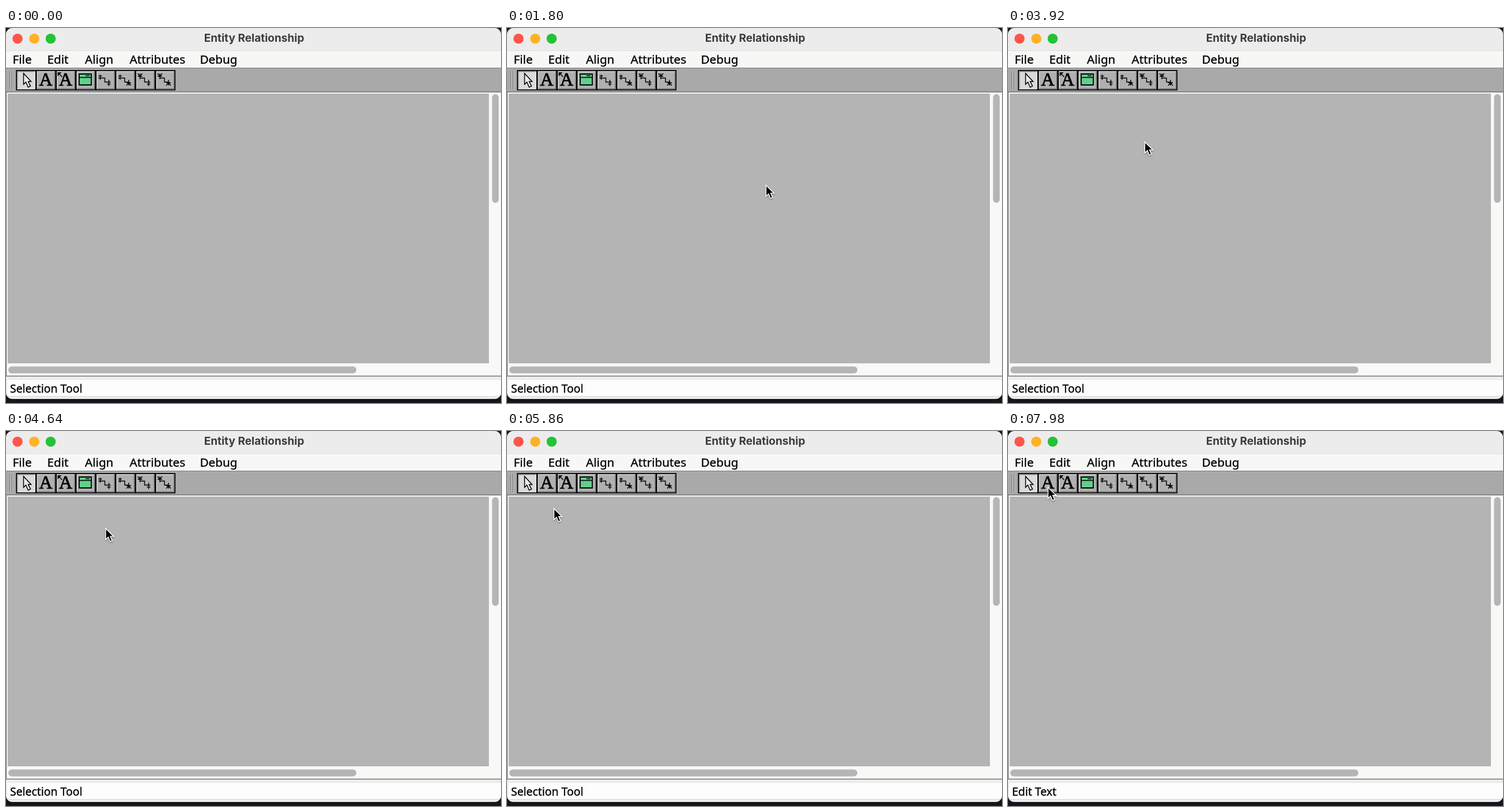
Animation of 859 by 652 pixels, one loop 8 s. Source, as an HTML page:

```html
<!DOCTYPE html>
<html>
<head>
<meta charset="utf-8">
<title>Entity Relationship</title>
<style>
  html, body { margin: 0; width: 100%; height: 100%; overflow: hidden; background: #15151c; }
  svg { display: block; width: 859px; height: 652px; }
  .ui { font: 20.7px "Noto Sans", "Open Sans", sans-serif; stroke: #000; stroke-width: .35px; }
  .status { font-size: 19.4px; }
  .title { font: 700 19px Inter, "Liberation Sans", sans-serif; fill: #3c3c3c; }
  .letter { font: 32px "Liberation Serif", serif; stroke: #000; stroke-width: .9px; }
  .line { fill: none; stroke: #000; stroke-width: 1.4px; }
</style>
</head>
<body>
<svg viewBox="0 0 859 652">
  <defs>
    <clipPath id="window"><rect width="859" height="645" rx="11"/></clipPath>
    <filter id="shadow" x="-50%" y="-50%" width="200%" height="200%">
      <feDropShadow dx="0" dy="1.5" stdDeviation="1.3" flood-opacity=".4"/>
    </filter>
  </defs>
  <g clip-path="url(#window)">
    <rect width="859" height="645" fill="#ececec"/>
    <circle cx="20" cy="18.5" r="8.8" fill="#ff544b"/>
    <circle cx="49" cy="18.5" r="8.8" fill="#ffb125"/>
    <circle cx="77.5" cy="18.5" r="8.8" fill="#22c336"/>
    <text class="title" x="430.5" y="24.3" text-anchor="middle">Entity Relationship</text>

    <rect y="39" width="859" height="30" fill="#f7f7f5"/>
    <rect y="39" width="859" height="1" fill="#dedede"/>
    <g id="menu" class="ui"></g>

    <rect y="69" width="859" height="42" fill="#a9a9a9"/>
    <rect y="69" width="859" height="1" fill="#7c7c7c"/>
    <path d="M6.5 75V106M10.5 75V106" stroke="#777"/>
    <path d="M7.5 75V106M11.5 75V106" stroke="#ccc"/>
    <g id="tools"></g>

    <rect y="111" width="859" height="495" fill="#f8f8f6"/>
    <rect x="3" y="114" width="835" height="469" fill="#b4b4b4"/>
    <path d="M0 111.2H859M.5 111V605M0 605.2H859" stroke="#777" stroke-width="1.4"/>
    <rect x="843.5" y="115" width="11.5" height="189" rx="5.7" fill="#b5b5b5"/>
    <rect x="4" y="588.5" width="604" height="12" rx="6" fill="#b5b5b5"/>

    <rect x="2" y="612" width="857" height="28" fill="#fdfdfd"/>
    <path d="M0 640.5H859" stroke="#d5d5d5"/>
    <text id="status" class="ui status" x="7" y="633.5"></text>
  </g>
  <path id="cursor" filter="url(#shadow)" fill="#000" stroke="#fff" stroke-width="1.4"
    d="M.5 1.5V20.5L4.9 16.4L8.2 24.2L11.8 22.7L8.7 15.2H14.4Z"/>
</svg>
<script>
const byId = id => document.getElementById(id);

const menuItems = { File: 11.5, Edit: 71.5, Align: 137, Attributes: 214.5, Debug: 336.5 };
byId("menu").innerHTML = Object.entries(menuItems)
  .map(([label, x]) => `<text x="${x}" y="62">${label}</text>`).join("");

// Connector icon: each end is either a double bar ("one") or a crow's foot ("many").
function connector(startMany, endMany) {
  const start = startMany ? "M8 6V16M4 11H12M8 11L4 6M8 11L12 6" : "M8 8V17M5 10.5H11M5 14H11";
  const end = endMany ? "M23 17V27M19 22H27M23 22L19 27M23 22L27 27" : "M23 17V28M20 21H26M20 24.5H26";
  return `<path class="line" d="M8 14H16V21H23${start}${end}"/>`;
}

const letter = '<text class="letter" x="17" y="27" text-anchor="middle">A</text>';
const icons = [
  '<path d="M13 6V25L17 21L21 30L25 28L21 20H26Z" fill="#eee" stroke="#000" stroke-width="1.5"/>',
  letter,
  letter + '<path d="M3 4H10L3 11Z"/><path class="line" d="M4 5L11 12"/>',
  '<path d="M6 7H27V26H6Z" fill="#62cf8b" stroke="#000" stroke-width="1.8"/><path class="line" d="M6 13H27M17 10H24"/>',
  connector(false, false),
  connector(false, true),
  connector(true, false),
  connector(true, true)
];
byId("tools").innerHTML = icons.map((icon, i) => `
  <g transform="translate(${17.5 + i * 34.5} 73)">
    <rect x=".7" y="1" width="33.5" height="33.5" fill="${i ? "#b0b0b0" : "#dadada"}" stroke="#000" stroke-width="1.8"/>
    <path d="M2.4 32V2.7H32" fill="none" stroke="${i ? "#d4d4d4" : "#999"}" stroke-width="1.4"/>
    <path d="M3 32.6H32.6V3" fill="none" stroke="${i ? "#707070" : "#e4e4e4"}" stroke-width="1.4"/>
    ${icon}
  </g>`).join("");

// Pointer path: time, x, y of the tip
const path = [
  [120, 858, 560], [400, 640, 400], [860, 468, 300], [1000, 462, 296],
  [1680, 449, 272], [2480, 449, 272], [2820, 335.5, 240.5], [4640, 172.5, 168],
  [5860, 81, 133.5], [6980, 70, 109.5], [7980, 69, 96.5]
];

function pointerAt(time) {
  const next = path.findIndex(point => point[0] > time);
  if (next < 0) return path[path.length - 1].slice(1);
  const [t0, x0, y0] = path[next - 1], [t1, x1, y1] = path[next];
  const k = (time - t0) / (t1 - t0);
  return [x0 + (x1 - x0) * k, y0 + (y1 - y0) * k];
}

function draw(now) {
  const time = now % 8000;
  const visible = time >= path[0][0];
  const [x, y] = visible ? pointerAt(time) : [0, 0];
  byId("cursor").style.display = visible ? "" : "none";
  byId("cursor").setAttribute("transform", `translate(${x} ${y})`);
  byId("status").textContent = visible && y < 107 ? "Edit Text" : "Selection Tool";
  requestAnimationFrame(draw);
}
draw(performance.now());
</script>
</body>
</html>
```
